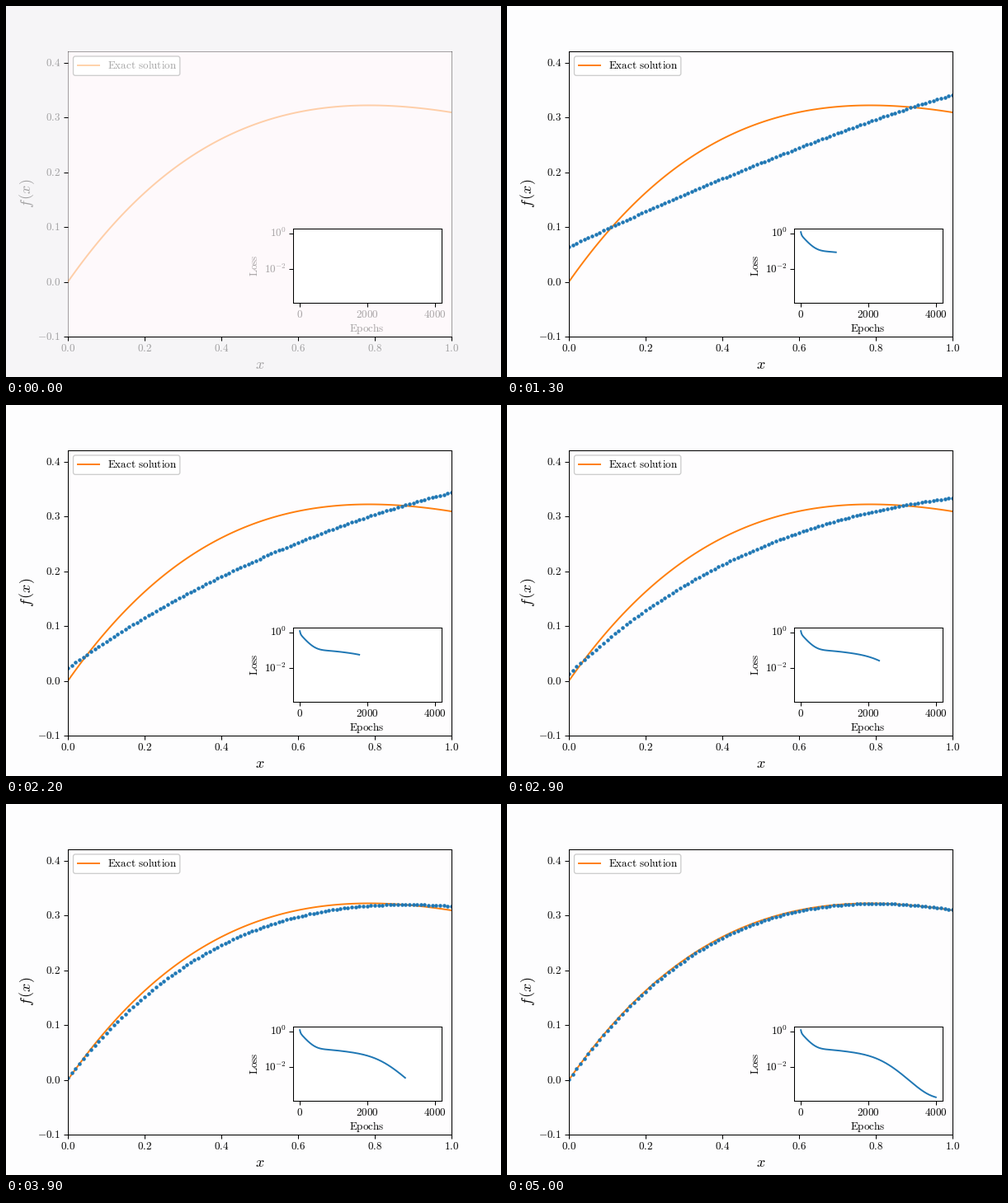
A matplotlib script for the animation above (5100 ms loop, 600 by 450 pixels).

```python
import numpy as np
import matplotlib.pyplot as plt
from matplotlib.animation import FuncAnimation
from matplotlib.patches import FancyBboxPatch

plt.rcParams["mathtext.fontset"] = "cm"

W, H, DPI = 600, 450, 93.75
FRAMES, STEP = 51, 80  # epochs trained per frame
BLUE, ORANGE = "#1f77b4", "#ff7f0e"

x = np.linspace(0, 1, 101)
exact = np.exp(-x) * np.sin(x)


def error(epoch):
    """Network output minus exact solution: an offset and two shapes that fade."""
    tilt = (1 - 1.9 * x) * (1 - 1.3 * x + 0.47 * x**2)
    bend = (x - 0.87) * (x - 0.035) * (0.61 - 0.27 * x)
    rise = 1 - np.exp(-(epoch / 600) ** 2)
    fall = 1 / (1 + np.exp((epoch - 2450) / 430))
    return (0.42 * np.exp(-epoch / 30) + 0.6 * np.exp(-epoch / 408) * tilt
            + rise * fall * bend)


def log_loss(epoch):
    """Residual of the differential equation plus the boundary term."""
    e = error(epoch)
    residual = np.gradient(e, x) + e
    return np.log10(np.mean(residual**2) + e[0] ** 2 + 1.5e-4)


epochs = np.arange(0, STEP * FRAMES, 20)
losses = [log_loss(epoch) for epoch in epochs]

fig = plt.figure(figsize=(W / DPI, H / DPI), dpi=DPI)
faded = []


def add_plot(left, top, right, bottom, **limits):
    """Axes placed in pixels from the top left, without tick labels."""
    axes = fig.add_axes([left / W, 1 - bottom / H, (right - left) / W, (bottom - top) / H])
    axes.set(**limits)
    axes.tick_params(labelbottom=False, labelleft=False)
    return axes


ax = add_plot(75, 55, 540, 401, xlim=(0, 1), ylim=(-0.1, 0.421),
              xticks=np.arange(0, 1.1, 0.2), yticks=np.arange(-0.1, 0.41, 0.1))
faded += ax.plot(x, exact, color=ORANGE, lw=1.5)
dots, = ax.plot([], [], "o", color=BLUE, ms=3.5, mew=0)
faded += [ax.spines[side] for side in ("left", "top", "right")]

# Loss inset, drawn in powers of ten
inset = add_plot(348, 270, 528, 360, xlim=(-200, 4200), ylim=(-3.887, 0.28),
                 xticks=[0, 2000, 4000], yticks=[-2, 0])
loss_line, = inset.plot([], [], color=BLUE, lw=1.5)

# Overlay in pixels for the legend and all text
over = fig.add_axes([0, 0, 1, 1])
over.set(xlim=(0, W), ylim=(H, 0))
over.axis("off")


def label(left, base, text, size=10, ha="center", rotation=0):
    faded.append(over.text(left, base, f"${text}$", fontsize=size, ha=ha, va="baseline",
                           rotation=rotation, rotation_mode="anchor"))


over.add_patch(FancyBboxPatch((81.5, 61), 129.3, 23.3, fc="white", ec="0.8", lw=1,
                              boxstyle="round,pad=0,rounding_size=2.6"))
faded += over.plot([86.7, 112.7], [71.5, 71.5], color=ORANGE, lw=1.5)
label(122.7, 75.5, r"\mathrm{Exact\>\,solution}", ha="left")

for k in range(6):
    label(75 + 93 * k, 419, f"{k / 5:.1f}")
    label(66, 405 - 66.4 * k, f"{(k - 1) / 10:.1f}", ha="right")
for k in range(3):
    label(356.2 + 81.8 * k, 378, str(2000 * k))
label(339.5, 280.3, "10^{0}", ha="right")
label(339.5, 323.5, "10^{-2}", ha="right")
label(437.5, 394.7, r"\mathrm{Epochs}")
label(305, 315, r"\mathrm{Loss}", rotation=90)
label(307.5, 439.5, "x", size=14)
label(30, 227.5, r"f\hspace{0.12}(x)", size=14, rotation=90)


def draw(n):
    epoch = n * STEP
    dots.set_data(x, exact + error(epoch))
    done = epoch // 20 + 1
    loss_line.set_data(epochs[:done], losses[:done])

    # The plot comes up out of a pale haze
    clear = min(1, n / 2)
    for artist in faded:
        artist.set_alpha(0.35 + 0.65 * clear)
    fig.set_facecolor((0.965 + 0.028 * clear, 0.962 + 0.031 * clear, 0.97 + 0.028 * clear))
    ax.set_facecolor((0.995, 0.977 + 0.017 * clear, 0.985 + 0.013 * clear))
    return dots, loss_line


anim = FuncAnimation(fig, draw, frames=FRAMES, interval=100, repeat=True, blit=False)
plt.show()
```
